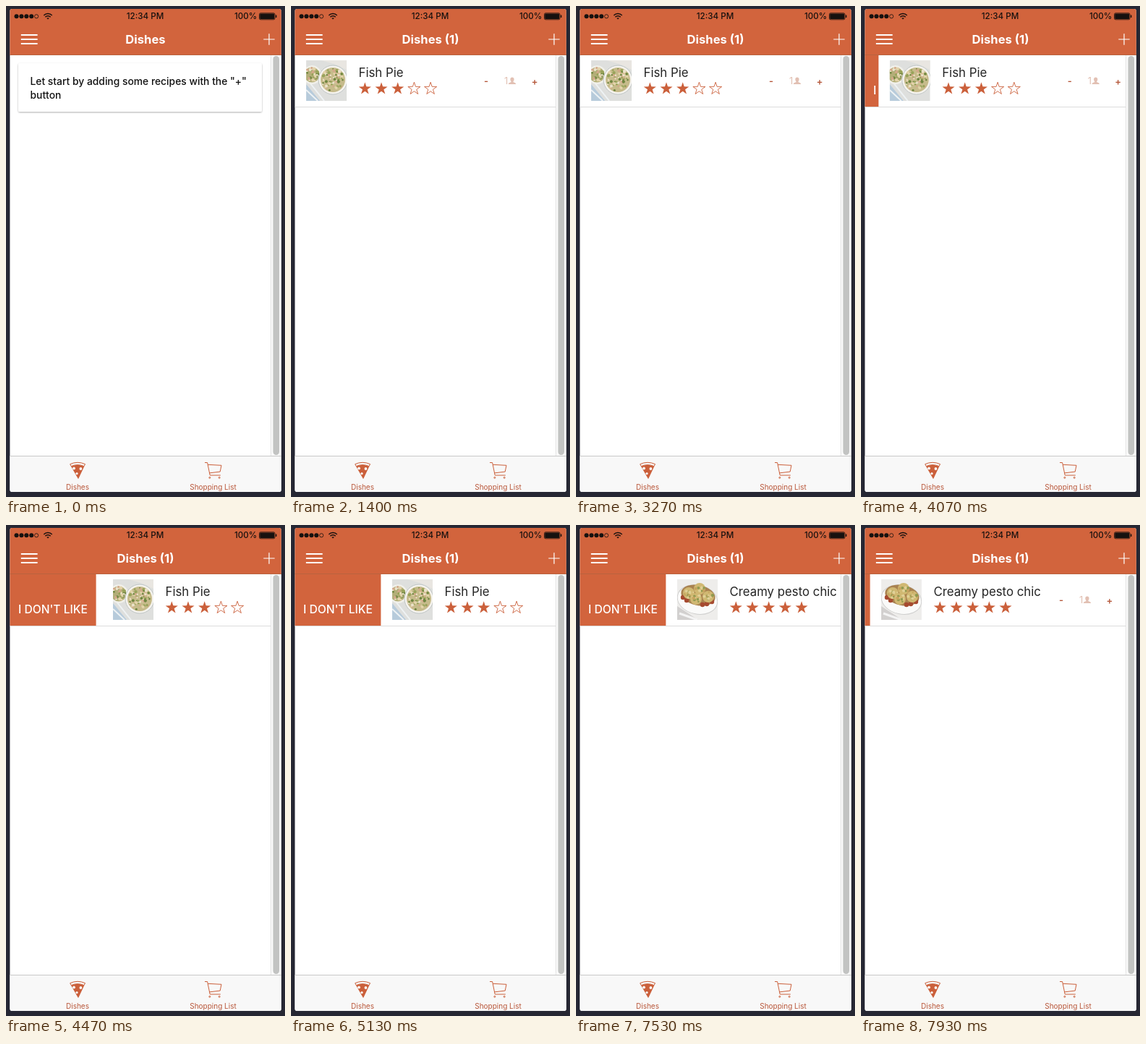
An HTML page for the animation above (8 s loop, 386 px wide and 678 px high).

```html
<!DOCTYPE html>
<html lang="en">
<head>
<meta charset="utf-8">
<title>Dishes</title>
<style>
  html, body { margin: 0; width: 100%; height: 100%; overflow: hidden; background: #262733; }
  svg { display: block; width: 386px; height: 678px; font-family: Inter, "Noto Sans", sans-serif; }
  .accent { fill: #cb603b; }
  .line { fill: none; stroke: #cb603b; }
  .middle { text-anchor: middle; }
  .tab { font-size: 10px; text-anchor: middle; fill: #b9573a; }
  .status { font-size: 11.6px; font-weight: 500; fill: #17110f; }
  .name { font-size: 16.8px; fill: #252525; }
</style>
</head>
<body>
<svg viewBox="0 0 386 678">
  <defs>
    <clipPath id="screen"><rect x="5.4" y="4" width="375.4" height="667" rx="3"/></clipPath>
    <clipPath id="list"><rect x="5" y="68" width="361" height="553"/></clipPath>
    <clipPath id="thumb"><rect x="21" y="75" width="56" height="56"/></clipPath>
    <filter id="shadow" x="-5%" y="-10%" width="110%" height="125%">
      <feDropShadow dx="0" dy="1" stdDeviation="1.2" flood-opacity=".32"/>
    </filter>
  </defs>
  <rect width="386" height="678" fill="#262733"/>
  <g clip-path="url(#screen)">
    <rect x="5" y="4" width="376" height="667" fill="#fff"/>

    <g clip-path="url(#list)">
      <g id="intro">
        <rect x="17" y="79" width="337" height="67" rx="2" fill="#fff" filter="url(#shadow)"/>
        <g font-size="13.85" font-weight="500" fill="#111">
          <text x="33.5" y="108.5">Let start by adding some recipes with the "+"</text>
          <text x="33.5" y="128">button</text>
        </g>
      </g>
      <g id="row">
        <path d="M5 139.5H366" stroke="#dcdcdc"/>
        <g id="option">
          <rect x="5" y="68" width="119.6" height="71" fill="#d2643d"/>
          <text x="65" y="121.5" class="middle" font-size="15.6" font-weight="500" fill="#fff">I DON'T LIKE</text>
        </g>
        <g id="item">
          <rect x="5.6" y="68" width="361" height="71" fill="#fff"/>
          <g id="photo" clip-path="url(#thumb)"></g>
          <text id="name" class="name" x="93.5" y="97.5"></text>
          <g id="stars"></g>
          <g class="middle" font-size="13" font-weight="600" fill="#b5583b">
            <text x="270" y="108">-</text>
            <text x="337" y="108.5">+</text>
          </g>
          <g fill="#e2c0b3">
            <text x="295" y="108" font-size="13">1</text>
            <path d="M306 98.5c2 0 2.8 1.5 2.6 3.2-.2 1.4-.8 2-1.2 2.6 0 1.6 3.6 1.2 3.8 3.7h-10.4c.2-2.5 3.8-2.1 3.8-3.7-.4-.6-1-1.2-1.2-2.6-.2-1.7.6-3.2 2.6-3.2z"/>
          </g>
        </g>
      </g>
    </g>

    <rect x="366" y="68" width="15" height="553" fill="#fafafa"/>
    <path d="M366.5 68V621" stroke="#e3e3e3"/>
    <rect x="369.5" y="69" width="8.5" height="551" rx="4.2" fill="#c2c3c2"/>

    <rect x="5" y="4" width="376" height="64" fill="#d2643d"/>
    <path d="M5 67.5H381" stroke="#b9633f"/>
    <g id="signal"></g>
    <g fill="none" stroke="#17110f" stroke-width="1.5">
      <path d="M52.3 13a8 8 0 0 1 11.4 0M54.3 15.2a5.2 5.2 0 0 1 7.4 0"/>
      <path d="M56.2 16.8 58 18.6 59.8 16.8Q58 15.5 56.2 16.8z" fill="#17110f" stroke="none"/>
      <rect x="350.5" y="9.8" width="21.5" height="9" rx="1.8" stroke-width=".8"/>
      <rect x="351.2" y="10.5" width="20.1" height="7.6" rx="1" fill="#17110f" stroke="none"/>
      <path d="M373.7 12.5v3.5" stroke-width="1.4"/>
    </g>
    <text x="192.5" y="18.3" class="status middle">12:34 PM</text>
    <text x="347.3" y="18.3" class="status" text-anchor="end">100%</text>
    <path d="M20.8 40H43.6M20.8 46H43.6M20.8 52H43.6" stroke="#fff" stroke-width="1.8"/>
    <path d="M356.3 46H371.7M364 38.3V53.7" stroke="#fff" stroke-width="1.2"/>
    <text id="title" x="193" y="52" class="middle" font-size="16.6" font-weight="700" fill="#fff"></text>

    <rect x="5" y="621" width="376" height="50" fill="#f8f8f8"/>
    <path d="M5 621.5H381" stroke="#c9c9c9"/>
    <path class="line" d="M88.7 632.6Q99 628 109.5 632.6L108 635.6Q99 631.6 90.2 635.6z"/>
    <path class="accent" d="M90 635.8Q99 631.6 108.3 635.8L100 653.2z"/>
    <g fill="#f8f8f8">
      <circle cx="94" cy="638.4" r="1.9"/><circle cx="103.4" cy="639" r="1.9"/><circle cx="98" cy="645.6" r="1.6"/>
    </g>
    <g class="line" stroke-width="1">
      <path d="M275 630.5h3.6l3.6 17.5h14.6M279.2 633.3l18.8 1-1.8 8.8-15 1.8"/>
      <circle cx="281.8" cy="651.3" r="1"/><circle cx="295.2" cy="651.3" r="1"/>
    </g>
    <text x="99" y="667.5" class="tab">Dishes</text>
    <text x="286.5" y="667.5" class="tab">Shopping List</text>
  </g>
</svg>
<script>
const LOOP = 8000, ADD_AT = 700, SWAP_AT = 5270;
const OPEN = 119, OVERSHOOT = 127;
const byId = id => document.getElementById(id);

const circle = (x, y, r, fill, extra = '') =>
  `<circle cx="${x}" cy="${y}" r="${r}" fill="${fill}" ${extra}/>`;

function seeded(seed) {
  return () => (seed = seed * 16807 % 2147483647) / 2147483647;
}

// Small food pieces spread evenly over a round area
function scatter(cx, cy, radius, count, colors, seed) {
  const random = seeded(seed);
  return Array.from({ length: count }, (_, i) => {
    const angle = random() * Math.PI * 2, d = Math.sqrt(random()) * radius;
    return circle((cx + d * Math.cos(angle)).toFixed(1), (cy + d * Math.sin(angle)).toFixed(1),
      (0.9 + random() * 1.4).toFixed(1), colors[i % colors.length]);
  }).join('');
}

const pieColors = ['#6f8640', '#e3d3aa', '#98a35a', '#ece3cb', '#d3a98a'];
const piePhoto = `
  <rect x="21" y="75" width="56" height="56" fill="#dedfdd"/>
  <path d="M21 108L40 131H21z" fill="#b7cbdb"/>
  <path d="M42 75H77V88L60 80z" fill="#e9e6e1"/>
  <path d="M21 116l16 15M26 106l20 25" stroke="#eef2f4" stroke-width="2"/>
  ${circle(29, 95, 13, '#f1f0eb')}${circle(29, 95, 10.5, '#b3ae78')}
  ${scatter(29, 95, 9.5, 32, pieColors, 41)}
  ${circle(58, 102, 20, '#f5f3ee', 'stroke="#bfc5c6"')}${circle(58, 102, 17, '#c6bb8b')}
  ${scatter(58, 102, 15.5, 75, pieColors, 97)}`;

const patties = [[37, 94], [52, 88], [47, 102], [64, 99]];
const pestoPhoto = `
  <rect x="21" y="75" width="56" height="56" fill="#eeedeb"/>
  <path d="M21 112L50 131H21z" fill="#d2d0cf"/>
  <path d="M24 122l25 9" stroke="#f4f4f4" stroke-width="3"/>
  <ellipse cx="49" cy="103" rx="28" ry="20" fill="#fafaf9" stroke="#cfcfce" transform="rotate(12 49 103)"/>
  <ellipse cx="50" cy="97" rx="24" ry="14" fill="#a98250" transform="rotate(12 50 97)"/>
  ${[[29, 100], [34, 104], [62, 109], [69, 106], [56, 110]].map(([x, y]) => circle(x, y, 3.2, '#a64a30')).join('')}
  ${patties.map(([x, y], i) =>
    circle(x, y, 8, '#d0b872') + scatter(x, y, 6.5, 13, ['#e0d096', '#8f9a50', '#c5a35e'], 31 + i)).join('')}`;

const dishes = [
  { name: 'Fish Pie', rating: 3, photo: piePhoto },
  { name: 'Creamy pesto chic', rating: 5, photo: pestoPhoto },
];

function star(cx, cy, filled) {
  const points = Array.from({ length: 10 }, (_, i) => {
    const r = i % 2 ? 3.5 : 9, a = i * Math.PI / 5;
    return `${(cx + r * Math.sin(a)).toFixed(2)},${(cy - r * Math.cos(a)).toFixed(2)}`;
  }).join(' ');
  return `<polygon points="${points}" ${filled ? 'class="accent"' : 'class="line" stroke-width=".9"'}/>`;
}

byId('signal').innerHTML = [0, 1, 2, 3, 4].map(i =>
  circle(14.5 + i * 6.9, 14.3, i < 4 ? 3 : 2.6, i < 4 ? '#17110f' : 'none', i < 4 ? '' : 'stroke="#17110f" stroke-width=".8"')
).join('');

let shown = null;
function showDish(dish) {
  if (dish === shown) return;
  shown = dish;
  byId('photo').innerHTML = dish.photo;
  byId('name').textContent = dish.name;
  byId('stars').innerHTML = [0, 1, 2, 3, 4].map(i => star(102.3 + i * 22.7, 114.2, i < dish.rating)).join('');
}

const progress = (t, start, duration) => Math.min(1, Math.max(0, (t - start) / duration));
const easeOut = p => 1 - (1 - p) ** 3;
const easeInOut = p => p * p * (3 - 2 * p);

function swipeOffset(t) {
  const drag = OVERSHOOT * easeInOut(progress(t, 3950, 500));
  const settle = (OVERSHOOT - OPEN) * easeOut(progress(t, 4560, 350));
  const close = OPEN * easeOut(progress(t, 7686, 400));
  return drag - settle - close;
}

function render(t) {
  const added = t >= ADD_AT, offset = swipeOffset(t);
  byId('intro').style.display = added ? 'none' : '';
  byId('row').style.display = added ? '' : 'none';
  byId('title').textContent = added ? 'Dishes (1)' : 'Dishes';
  showDish(dishes[t < SWAP_AT ? 0 : 1]);
  byId('option').style.display = offset > 0 ? '' : 'none';
  byId('item').setAttribute('transform', `translate(${offset.toFixed(2)} 0)`);
}

function tick() {
  render(performance.now() % LOOP);
  requestAnimationFrame(tick);
}
tick();
</script>
</body>
</html>
```
